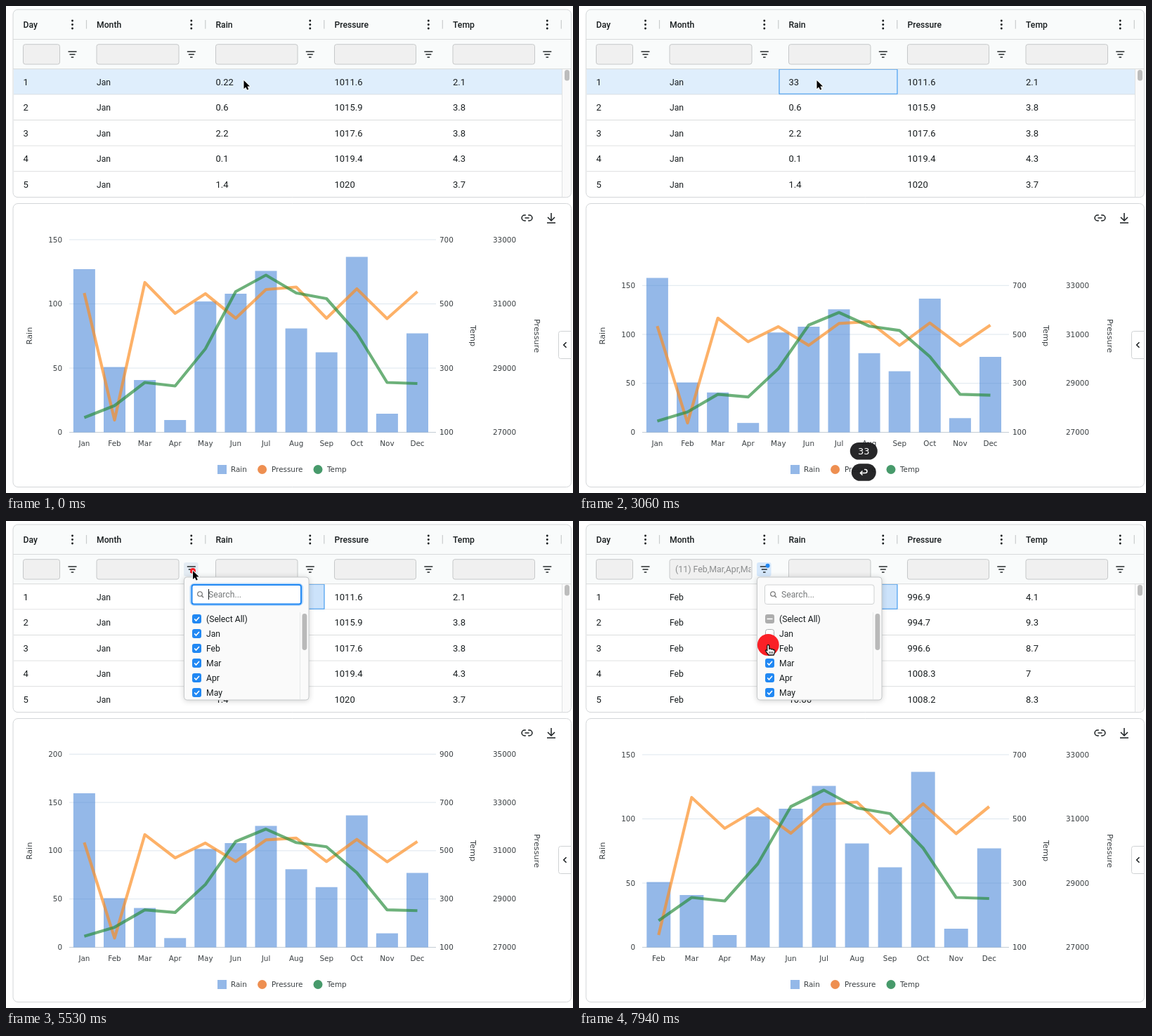
Animation of 807x694 px, one loop 8000 ms. Source, as an HTML page with a canvas:

```html
<!DOCTYPE html>
<html lang="en">
<head>
<meta charset="utf-8">
<title>Weather grid</title>
<style>
html, body { margin: 0; width: 100%; height: 100%; overflow: hidden; background: #fff; }
canvas { display: block; }
</style>
</head>
<body>
<canvas id="stage" width="807" height="694"></canvas>
<script>
const c = document.getElementById('stage').getContext('2d');
const LOOP = 8000;
const INK = '#181d1f', LINE = '#d8dadb', BLUE = '#2188f3', RED = '#fa2027';
const UI = 'Roboto, sans-serif', CHART = '"DejaVu Sans", sans-serif';
const MONTHS = 'Jan Feb Mar Apr May Jun Jul Aug Sep Oct Nov Dec'.split(' ');

// When things happen, in ms
const CLICK1 = 290, CLICK2 = 760, TYPE1 = 1590, TYPE2 = 1820, ENTER = 2710,
  LEAVE = 4410, MENU_CLICK = 5180, MENU = 5300, DOWN = 5960, UNCHECK = 6820,
  ROWS_MOVE = 6890, CHART2 = 7008, LAST_CLICK = 7820;

const clamp = v => Math.max(0, Math.min(1, v));
const span = (t, from, length) => clamp((t - from) / length);
const mix = (a, b, p) => a + (b - a) * p;
const easeOut = (p, power = 2) => 1 - Math.pow(1 - p, power);
const smooth = p => p * p * (3 - 2 * p);

function text(s, x, y, size = 12.2, { color = INK, weight = 400, font = UI, align = 'left' } = {}) {
  c.font = `${weight} ${size}px ${font}`;
  c.fillStyle = color;
  c.textAlign = align;
  c.fillText(s, x, y);
}
function box(x, y, w, h, r, fill, stroke, lineWidth = 1) {
  c.beginPath();
  c.roundRect(x, y, w, h, r);
  if (fill) { c.fillStyle = fill; c.fill(); }
  if (stroke) { c.strokeStyle = stroke; c.lineWidth = lineWidth; c.stroke(); }
}
function path(points, color, width = 1) {
  c.beginPath();
  points.forEach(([x, y]) => c.lineTo(x, y));
  c.strokeStyle = color;
  c.lineWidth = width;
  c.stroke();
}
function disc(x, y, r, color) {
  c.beginPath();
  c.arc(x, y, r, 0, Math.PI * 2);
  c.fillStyle = color;
  c.fill();
}
function clipped(x, y, w, h, draw) {
  c.save();
  c.beginPath();
  c.rect(x, y, w, h);
  c.clip();
  draw();
  c.restore();
}

// Pointer
function pointerAt(t) {
  if (t < DOWN) {
    const p = span(t, LEAVE, 530);
    return [mix(338.5, 266, easeOut(p, 1.9)), mix(106, 71, p)];
  }
  const p = smooth(span(t, DOWN, 720)), q = smooth(span(t, 7290, 300));
  return [mix(266, 271, p) - 1.7 * q, mix(71, 160.5, p) + 16 * q];
}
function drawPointer(t) {
  const [x, y] = pointerAt(t);
  c.save();
  c.translate(x, y);
  c.lineJoin = 'round';
  if (t >= CLICK2 && t < ENTER) {
    const half = s => {
      path([[-3, -6.5 * s], [-1, -6.5 * s], [0, -5.5 * s], [1, -6.5 * s], [3, -6.5 * s]], '#222', 1.2);
    };
    c.translate(0.5, 0.8);
    half(1);
    half(-1);
    path([[0, -6], [0, 6]], '#222', 1.2);
    path([[-2, 1], [2, 1]], '#222', 1.2);
  } else if (y > 130) {
    const hand = new Path2D('M-1.5 1.5C-1.5-.5 1.3-.5 1.5 1.5V6C2.5 5 4.2 5.2 4.5 6.5C5.6 5.7 7 6.2 7.1 7.3C8.5 6.7 9.5 7.5 9.5 8.8C9.5 12 8.2 12.5 8 14.5H.4C0 12.7-4.2 9.5-3.8 8C-3.4 6.9-2.2 7.6-1.5 8.4Z');
    c.lineWidth = 1.3;
    c.strokeStyle = '#111';
    c.fillStyle = '#fff';
    c.fill(hand);
    c.stroke(hand);
    for (const fx of [1.8, 4.1, 6.4]) path([[fx, 9.5], [fx, 12.5]], '#111', 0.9);
  } else {
    const arrow = new Path2D('M0 0V12L2.8 9.4L4.7 13.6L6.8 12.7L4.9 8.6H8.6Z');
    c.lineWidth = 1.8;
    c.strokeStyle = '#fff';
    c.stroke(arrow);
    c.fillStyle = '#000';
    c.fill(arrow);
  }
  c.restore();
}
function drawClicks(t) {
  for (const start of [CLICK1, CLICK2, MENU_CLICK, UNCHECK, LAST_CLICK]) {
    const age = t - start;
    if (age >= 0 && age < 420) disc(...pointerAt(start), 21.5 * (1 - age / 430), RED);
  }
}

// Grid
const COLUMNS = [['Day', 24.5, 52], ['Month', 129, 117], ['Rain', 298.5, 116.5], ['Pressure', 467.5, 116], ['Temp', 636, 116.5]];
const JAN = [['0.22', '1011.6', '2.1'], ['0.6', '1015.9', '3.8'], ['2.2', '1017.6', '3.8'], ['0.1', '1019.4', '4.3'], ['1.4', '1020', '3.7']];
const FEB = [['2.4', '996.9', '4.1'], ['0.8', '994.7', '9.3'], ['5.2', '996.6', '8.7'], ['1.6', '1008.3', '7'], ['10.06', '1008.2', '8.3']];
const ROW = 36.6;

function filterIcon(x) {
  [6, 4, 1.8].forEach((half, i) => path([[x - half, 65 + i * 4], [x + half, 65 + i * 4]], INK, 1.4));
}
function drawHeader(t) {
  box(10, 5, 794.5, 85, [7, 7, 0, 0], '#f9fbfb');
  path([[10, 47.5], [804, 47.5]], LINE);
  path([[10, 89.7], [804, 89.7]], LINE);
  const filtered = t >= ROWS_MOVE;
  COLUMNS.forEach(([name, x, w], i) => {
    const icon = x + w + (i ? 17.8 : 18);
    text(name, x, 30.7, 12.2, { weight: 500 });
    [21, 26.5, 32].forEach(y => disc(icon, y, 1.45, INK));
    path([[icon + 20, 20], [icon + 20, 32.5]], '#c9cccd', 1.2);
    box(x, 54.7, w, 28.3, 3, '#f0f0f0', '#c6c8c9');
    if (i === 1) {
      if (filtered) {
        clipped(x, 55, w - 1.5, 28, () => text('(11) Feb,Mar,Apr,May,Jun', 137, 73.3, 12.4, { color: '#8b8d8e' }));
        box(253, 59, 20.5, 20, 3, '#d6e8fb');
      } else if (t > 4850 && t < 6150) box(253, 59, 20.5, 20, 3, '#e4ecf3');
    }
    filterIcon(icon);
    if (i === 1 && filtered) disc(268.5, 63.8, 3, BLUE);
  });
}
function drawRow(i, y, month, values, { hover, focused, ranged }) {
  box(11, y - 18, 780.5, ROW, 0, hover ? '#dfeefc' : '#fff');
  path([[11, y + 18], [791, y + 18]], LINE);
  if (focused) box(285, y - 17.7, 168, 35, 0, ranged ? '#cce3fb' : null, '#3b97ee', 1.1);
  [String(i + 1), month, ...values].forEach((s, k) =>
    text(s, COLUMNS[k][1], y + 4.5, k === 1 ? 12.2 : 13));
}
function drawEditor(t) {
  box(285, 90.5, 168, 34.8, 3, '#fff', BLUE, 2);
  const typed = t < TYPE1 ? '0.22' : t < TYPE2 ? '3' : '33';
  if (t < TYPE1) box(293, 100, 25.5, 16, 0, '#accef3');
  text(typed, 293, 112.5, 13);
  if (t >= TYPE1 && t < 2290) path([[typed.length * 7.3 + 293.2, 100], [typed.length * 7.3 + 293.2, 116]], INK);
}
function drawGrid(t) {
  clipped(10, 90, 782, 182, () => {
    const done = t >= ROWS_MOVE;
    if (!done || t < ROWS_MOVE + 200) {
      c.globalAlpha = done ? 1 - span(t, ROWS_MOVE, 200) : 1;
      JAN.forEach((values, i) => {
        const shown = i === 0 && t >= ENTER ? ['33', ...values.slice(1)] : values;
        drawRow(i, 108 + i * ROW, 'Jan', shown, {
          hover: i === 0 && pointerAt(t)[1] > 90 && t < 5000,
          focused: i === 0 && t >= CLICK1 && !done,
          ranged: t >= MENU
        });
      });
      c.globalAlpha = 1;
    }
    if (done) {
      const p = easeOut(span(t, ROWS_MOVE, 400), 2.2);
      FEB.forEach((values, i) =>
        drawRow(i, mix(324 + i * 7, 108 + i * ROW, p), 'Feb', values, { focused: i === 0, ranged: true }));
    }
  });
  if (t >= CLICK2 && t < ENTER) drawEditor(t);
  box(791.5, 90, 12.5, 182, 0, '#fafafa');
  path([[791.5, 90], [791.5, 272]], '#e0e2e3');
  box(795, 91, 7, 15.5, 3.5, '#bdbdbd');
  drawHeader(t);
  box(10, 5, 794.5, 267.7, 7, null, '#d3d6d8');
}

// Column filter menu
function checkbox(x, y, state) {
  if (state === 'off') return box(x - 6, y - 6, 12, 12, 3, '#fff', '#aaadae');
  box(x - 6.5, y - 6.5, 13, 13, 3, state === 'some' ? '#adadad' : BLUE);
  path(state === 'some' ? [[x - 4, y], [x + 4, y]] : [[x - 3.3, y], [x - 1, y + 2.5], [x + 3.5, y - 2.5]], '#fff', 1.6);
}
function drawMenu(t) {
  c.save();
  c.shadowColor = 'rgba(0,0,0,.2)';
  c.shadowBlur = 8;
  c.shadowOffsetY = 1;
  box(253.5, 80, 177.5, 175, 4, '#fafafa');
  c.restore();
  box(253.5, 80, 177.5, 175, 4, null, '#c6c9ca');
  const focused = t < UNCHECK;
  if (focused) box(264, 91, 156.5, 27.5, 4, null, '#b5d8fa', 5);
  box(264.5, 91, 155.5, 27.5, 3, '#fff', focused ? BLUE : '#cfd1d2', focused ? 2 : 1);
  c.beginPath();
  c.arc(276, 104, 3.3, 0, 7);
  c.strokeStyle = '#666';
  c.lineWidth = 1.1;
  c.stroke();
  path([[278.4, 106.4], [281, 109]], '#666', 1.2);
  text('Search...', 288, 108.8, 12.2, { color: '#76797a' });
  if (focused && (t - MENU) % 1000 < 500) path([[288.5, 97], [288.5, 112]], INK);
  const unchecked = t >= UNCHECK;
  ['(Select All)', ...MONTHS.slice(0, 5)].forEach((label, i) => {
    const y = 139.5 + i * 21;
    checkbox(271.5, y, unchecked && i === 0 ? 'some' : unchecked && i === 1 ? 'off' : 'on');
    text(label, 285, y + 4.4);
  });
  path([[418.5, 130], [418.5, 254]], '#e6e8e8');
  box(421.5, 132, 6.8, 52, 3.4, '#b9b9b9');
}

// Chart: heights in px above the base line when the Rain axis ends at 150
const BASE = 607.5, SMALL = 0.752;
const RAIN = [232.5, 93, 74.5, 17.5, 186.5, 197.5, 230, 148, 114, 250, 26.5, 141];
const PRESSURE = [198.5, 17.5, 213.5, 169.5, 197.5, 162.5, 203.5, 207, 162.5, 204.5, 162, 200.5];
const TEMP = [21, 38, 71, 66, 119, 200.5, 224, 198.5, 190.5, 141.5, 71, 69.5];
const scaled = list => list.map(h => h * SMALL);
const YEAR = { scale: 1, x: 111.4, pitch: 43.1, width: 31, series: [RAIN, PRESSURE, TEMP] };
const EDITED = { ...YEAR, scale: SMALL, series: [[219.5, ...scaled(RAIN).slice(1)], scaled(PRESSURE), scaled(TEMP)] };
const FILTERED = { scale: 1, x: 113.3, pitch: 47.05, width: 34, series: YEAR.series.map(s => s.slice(1)) };

function blend(a, b, p) {
  const out = { series: b.series.map((s, k) => s.map((h, i) => mix(a.series[k][i], h, p))) };
  for (const key of ['scale', 'x', 'pitch', 'width']) out[key] = mix(a[key], b[key], p);
  return out;
}
function drawAxes(t, view) {
  const topAlpha = t < 6000 ? span(t, 3150, 90) : 1 - span(t, 6900, 100);
  const opts = { color: '#3a3f42', font: CHART };
  for (let i = 0; i < 5; i++) {
    c.globalAlpha = i < 4 ? 1 : topAlpha;
    const y = BASE - i * 91.5 * view.scale;
    path([[90, y], [612, y]], i ? '#dde6ee' : '#c3ccd4');
    text(i * 50, 80, y + 3.5, 10.4, { ...opts, align: 'right' });
    text(100 + i * 200, 617, y + 3.5, 10.4, opts);
    text(27000 + i * 2000, 693, y + 3.5, 10.4, opts);
  }
  c.globalAlpha = 1;
  const p = easeOut(span(t, CHART2, 440));
  MONTHS.forEach((name, i) => {
    if (i === 0 && t >= CHART2) return;
    const x = mix(YEAR.x + YEAR.pitch * i, FILTERED.x + FILTERED.pitch * (i - 1), p);
    text(name, x, 626.7, 10.4, { ...opts, align: 'center' });
  });
  [['Rain', 33, -1], ['Temp', 665, 1], ['Pressure', 755.5, 1]].forEach(([name, x, turn]) => {
    c.save();
    c.translate(x, 470);
    c.rotate(turn * Math.PI / 2);
    text(name, 0, 4, 11.3, { ...opts, align: 'center' });
    c.restore();
  });
}
function drawIcons() {
  const y = 302;
  for (const s of [-1, 1]) {
    c.beginPath();
    c.moveTo(741.5 + s * 1.7, y - 4);
    c.lineTo(741.5 + s * 3.4, y - 4);
    c.arc(741.5 + s * 3.4, y, 4, -Math.PI / 2, Math.PI / 2, s < 0);
    c.lineTo(741.5 + s * 1.7, y + 4);
    c.strokeStyle = INK;
    c.lineWidth = 1.5;
    c.stroke();
  }
  path([[738.5, y], [744.5, y]], INK, 1.5);
  path([[776, 295], [776, 305.5]], INK, 1.5);
  path([[771, 301], [776, 306], [781, 301]], INK, 1.5);
  path([[770, 309], [782, 309]], INK, 1.5);
}
function drawChart(t) {
  box(10, 281.5, 794.5, 404, 7, '#fff', '#d3d6d8');
  drawIcons();
  const view = t < CHART2
    ? blend(YEAR, EDITED, easeOut(span(t, ENTER, 440)))
    : blend(EDITED, FILTERED, easeOut(span(t, CHART2, 440)));
  drawAxes(t, view);
  const [rain, ...lines] = view.series;
  rain.forEach((h, i) =>
    box(view.x + view.pitch * i - view.width / 2, BASE - h, view.width, h, 0, 'rgba(77,137,217,.6)'));
  c.lineJoin = 'round';
  ['rgba(253,141,33,.68)', 'rgba(40,140,60,.68)'].forEach((color, k) =>
    path(lines[k].map((h, i) => [view.x + view.pitch * i, BASE - h]), color, 4.2));
  c.lineJoin = 'miter';
  box(301, 654, 13, 13, 0, '#94b8e8');
  disc(364.6, 660.5, 6.5, '#ee8f51');
  disc(444, 660.5, 6.5, '#479a6b');
  [['Rain', 320], ['Pressure', 378], ['Temp', 457]].forEach(([s, x]) =>
    text(s, x, 664.4, 10.4, { color: '#3a3f42', font: CHART }));
  box(786.5, 463.5, 18, 39, [3, 0, 0, 3], '#fff', '#cfd2d4');
  path([[797.5, 479.3], [793.7, 483], [797.5, 486.7]], INK, 1.5);
}

// Pressed keys
function pill(s, y) {
  const w = s.length > 1 ? 39 : 35;
  box(405.3 - w / 2, y - 12.3, w, 24.6, 12.3, 'rgba(28,28,30,.95)');
  if (s !== '↩') return text(s, 405.3, y + 4.7, 13, { color: '#fff', font: CHART, align: 'center' });
  c.beginPath();
  c.moveTo(400.5, y + 1);
  c.lineTo(407.5, y + 1);
  c.arc(407.5, y - 1.5, 2.5, Math.PI / 2, -Math.PI / 2, true);
  c.lineTo(406, y - 4);
  c.strokeStyle = '#fff';
  c.lineWidth = 1.5;
  c.stroke();
  path([[403.5, y - 2], [400.5, y + 1], [403.5, y + 4]], '#fff', 1.5);
}
function drawKeys(t) {
  if (t >= 1650 && t < 3820) pill(t < TYPE2 ? '3' : '33', t < ENTER ? 664.5 : 634.3);
  if (t >= ENTER && t < 4700) pill('↩', 664.5);
}

function draw(t) {
  c.fillStyle = '#fff';
  c.fillRect(0, 0, 807, 694);
  drawGrid(t);
  drawChart(t);
  drawKeys(t);
  if (t >= MENU) {
    c.globalAlpha = span(t, MENU - 40, 120);
    drawMenu(t);
    c.globalAlpha = 1;
  }
  drawClicks(t);
  drawPointer(t);
}

const begin = performance.now();
function tick() {
  draw((performance.now() - begin) % LOOP);
  requestAnimationFrame(tick);
}
tick();
</script>
</body>
</html>
```
